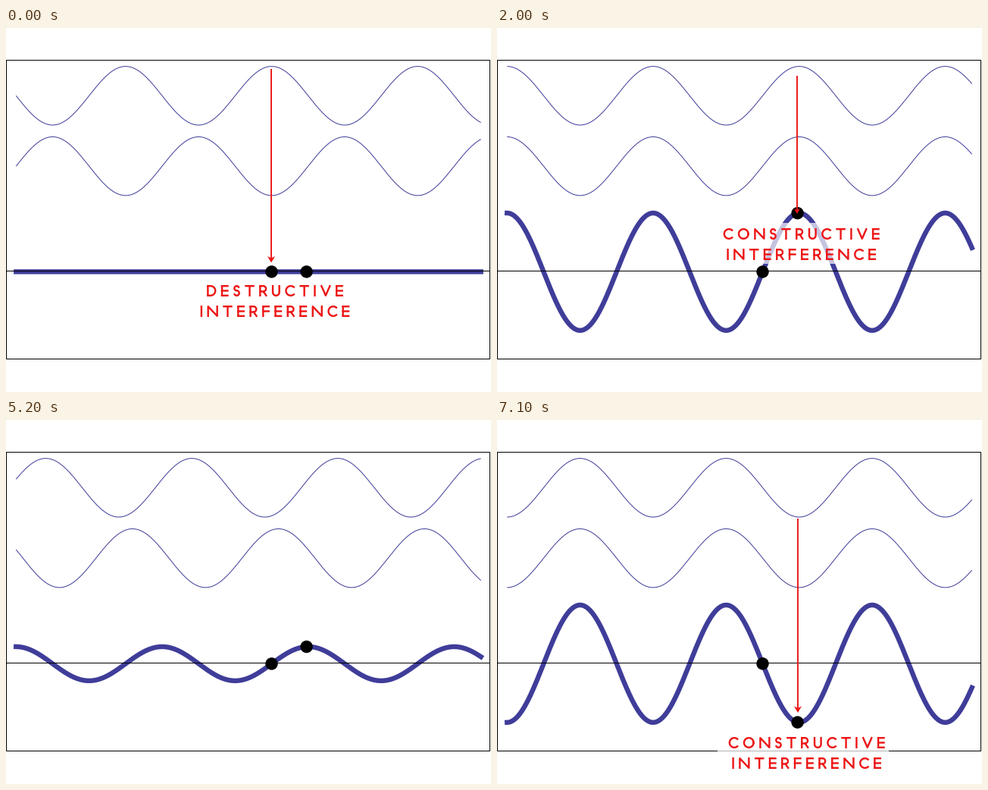
These frames come from a looping animation (640 by 480 pixels, 8 s). A matplotlib script:

```python
import numpy as np
import matplotlib.pyplot as plt
from matplotlib.animation import FuncAnimation
from matplotlib.patches import Circle, Polygon, Rectangle

W, H, DPI = 640, 480, 100
PX = 72 / DPI
BLUE, RED = "#3f3d99", "#ed1515"
X0, UNIT = 13.3, 30.67      # left end of the curves, pixels per radian
AMP = 38.7
MID = 321.4                 # rest height of the summed wave
STEP = 2 * np.pi / 64
CAP, STROKE, GAP = 12.6, 2.4, 8.8   # lettering

fig = plt.figure(figsize=(W / DPI, H / DPI), dpi=DPI, facecolor="white")
ax = fig.add_axes([0, 0, 1, 1])
ax.set_xlim(0, W)
ax.set_ylim(H, 0)
ax.axis("off")


def line(x, y, color, width, z, cap="butt"):
    return ax.plot(x, y, color=color, lw=width * PX, zorder=z, snap=False,
                   solid_capstyle=cap, solid_joinstyle="round")[0]


# Lettering: strokes as complex points, cap height 1, y pointing down
def arc(center, r, start, end):
    return list(center + r * np.exp(1j * np.radians(np.linspace(start, end, 40))))


def bar(y, width=.59):
    return [y * 1j, width + y * 1j]


STEM = [0, 1j]
GLYPHS = {
    "C": [arc(.5 + .5j, .5, -50, -310)],
    "D": [STEM, [0, *arc(.28 + .5j, .5, -90, 90), 1j]],
    "E": [STEM, bar(0), bar(.5), bar(1)],
    "F": [STEM, bar(0), bar(.5)],
    "I": [STEM],
    "N": [[1j, 0, .95 + 1j, .95]],
    "O": [arc(.5 + .5j, .5, 0, 360)],
    "R": [STEM, [0, *arc(.32 + .29j, .29, -90, 90), .58j], [.34 + .58j, .63 + 1j]],
    "S": [arc(.25 + .24j, .24, -30, -270) + arc(.25 + .74j, .26, -90, 150)],
    "T": [bar(0, .8), [.4, .4 + 1j]],
    "U": [[0, *arc(.34 + .66j, .34, 180, 0), .68]],
    "V": [[0, .44 + 1j, .88]],
}


def word(text, cx, top):
    strokes, pen = [], 0
    for ch in text:
        paths = [CAP * np.array(p) for p in GLYPHS[ch]]
        strokes += [p + pen for p in paths]
        pen += max(p.real.max() for p in paths) + GAP
    left, top = cx - (pen - GAP) / 2, top + STROKE / 2
    return [line(p.real + left, p.imag + top, RED, STROKE, 9, "projecting")
            for p in strokes]


def label(kind, cx, top):
    return word(kind, cx, top) + word("INTERFERENCE", cx, top + 27)


def arrow(x, top, tip, half=5):
    length = 1.7 * half
    head = Polygon([(x - half, tip - length), (x, tip - length * .72),
                    (x + half, tip - length), (x, tip)], fc=RED, lw=0, zorder=9)
    return [line([x, x], [top, tip - length / 2], RED, 1.9, 9), ax.add_patch(head)]


def veil(x, y):
    return [ax.add_patch(Rectangle((x, y), 226, 54, fc="white", alpha=.7, lw=0,
                                   zorder=8))]


u = np.linspace(0, 20, 500)
xs = X0 + UNIT * u
upper = line(xs, xs, BLUE, 1, 2)
lower = line(xs, xs, BLUE, 1, 2)
total = line(xs, xs, BLUE, 6.4, 3, "projecting")

line([0, 639], [320.5, 320.5], "black", 1, 4)
ax.add_patch(Rectangle((.5, 42.5), 638, 394, fill=False, ec="black", lw=PX,
                       zorder=4, snap=False))
dots = [ax.add_patch(Circle((x, MID), 8.2, fc="black", lw=0, zorder=5))
        for x in (350.5, 396.6)]

# Annotations keyed by the phase step at which the motion rests
notes = {
    -16: arrow(350, 54, 309.5) + label("DESTRUCTIVE", 355, 339),
    0: veil(284, 257) + arrow(396, 63, 245, 4) + label("CONSTRUCTIVE", 401.7, 264),
    32: veil(291, 411) + arrow(397, 130, 386) + label("CONSTRUCTIVE", 408.7, 418),
}


def step_at(i):
    """Hold, run a quarter turn to zero, hold, run half a turn, hold."""
    return np.clip(i - 20, -16, 0) + np.clip(i - 39, 0, 32)


def draw(i):
    k = step_at(i)
    phase = k * STEP
    swing = 2 * AMP * np.cos(phase)
    upper.set_ydata(89.3 - AMP * np.cos(u - phase))
    lower.set_ydata(182.2 - AMP * np.cos(u + phase))
    total.set_ydata(MID - swing * np.cos(u))
    for dot in dots:
        x = dot.center[0]
        dot.center = x, MID - swing * np.cos((x - X0) / UNIT)
    for key, group in notes.items():
        for artist in group:
            artist.set_visible(bool(key == k))


anim = FuncAnimation(fig, draw, frames=80, interval=100, repeat=True,
                     repeat_delay=0, blit=False)
plt.show()
```
